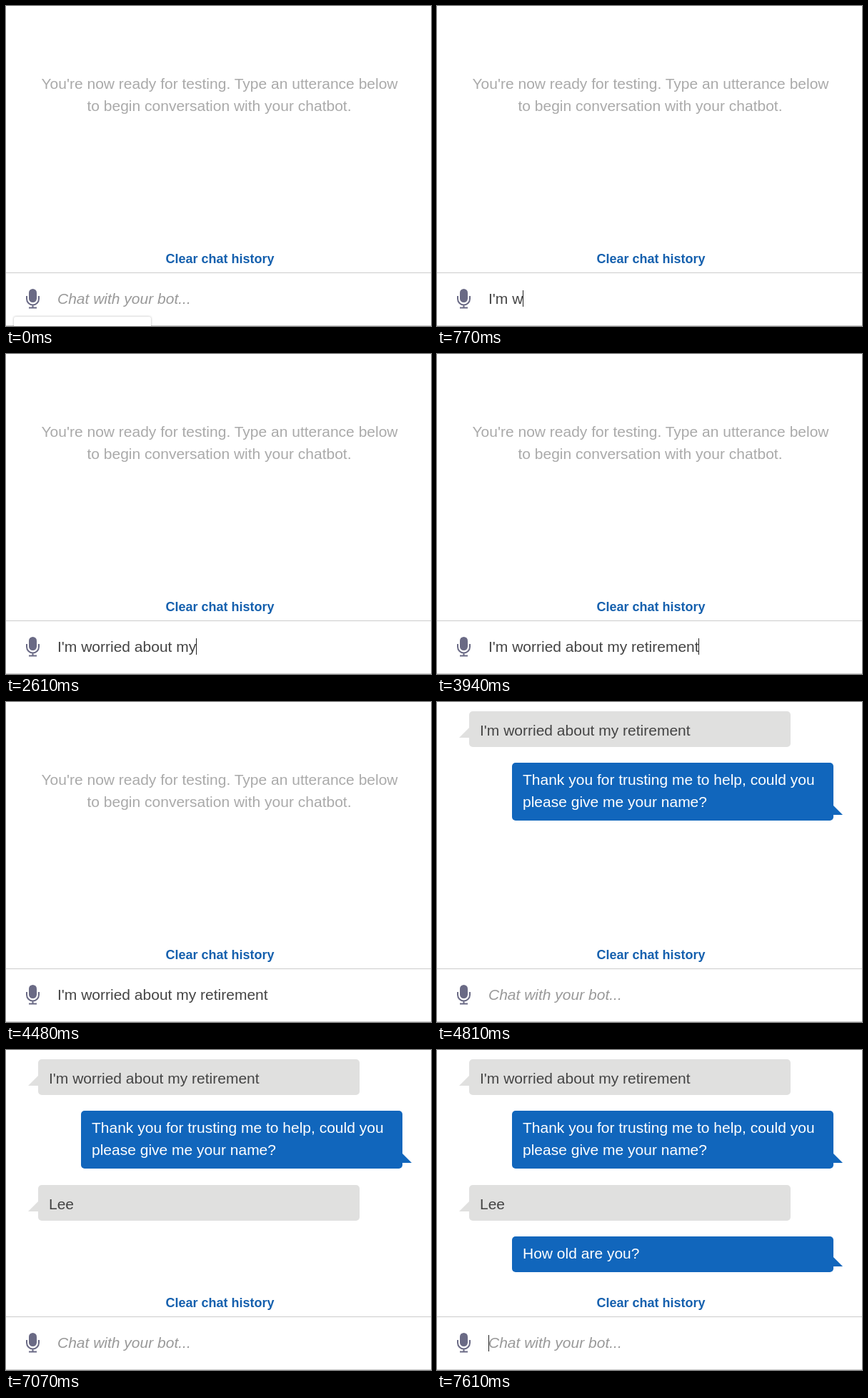
Write an HTML page that moves like this. It is 595 px wide and 448 px high and loops after 8000 ms.

```html
<!DOCTYPE html>
<html lang="en">
<head>
<meta charset="utf-8">
<title>Chatbot test</title>
<style>
html, body { margin: 0; height: 100%; overflow: hidden; background: #fff; }
svg { display: block; }
text { font: 21px "Liberation Sans", Arial, sans-serif; white-space: pre; fill: #444; }
.mid { text-anchor: middle; }
#intro text { fill: #aaa; }
#clear { font-weight: bold; font-size: 18px; fill: #1560ae; }
#hint { font-style: italic; fill: #999; }
.user { fill: #e0e0df; }
.bot { fill: #1166bc; }
.bot text { fill: #fff; }
.user text { fill: #444; }
#popup { fill: #fff; filter: drop-shadow(0 0 1.5px rgba(0, 0, 0, .3)); }
</style>
</head>
<body>
<svg width="595" height="448" viewBox="0 0 595 448">
  <g id="intro">
    <text class="mid" x="299" y="116">You're now ready for testing. Type an utterance below</text>
    <text class="mid" x="298.5" y="147">to begin conversation with your chatbot.</text>
  </g>
  <g id="chat"></g>
  <text id="clear" class="mid" x="299.5" y="360">Clear chat history</text>
  <path d="M0 373.5H595M0 447.5H595" stroke="#ccc"/>
  <rect x="32" y="396" width="11" height="19" rx="5.5" fill="#6a6a85"/>
  <path d="M29 406v4a8.5 8.5 0 0 0 17 0v-4M37.5 418.500v4M32 422.500h11" fill="none" stroke="#6a6a85" stroke-width="2"/>
  <text id="hint" x="72" y="417">Chat with your bot...</text>
  <text id="input" x="72" y="417"></text>
  <rect id="caret" width="1" height="23" fill="#222"/>
  <rect id="popup" x="11" y="435" width="192" height="20" rx="3"/>
</svg>
<script>
const LOOP = 8000;
const $ = id => document.getElementById(id);

// Typed messages: one key time per letter, then the time of sending
const typed = [
  { text: "I'm worried about my retirement", sent: 4540, keys: [
    200, 400, 540, 630, 770, 870, 960, 1160, 1290, 1420, 1620, 1750,
    1810, 1910, 2010, 2110, 2210, 2310, 2410, 2610, 2740, 2810, 2950,
    3150, 3280, 3420, 3520, 3620, 3740, 3840, 3940] },
  { text: "Lee", sent: 6870, keys: [6140, 6340, 6540] }
];
const blinks = [200, 4480, 5080, 5540, 6140, 7070, 7610];

const bubbles = [
  { at: 4540, y: 13, h: 50, lines: [typed[0].text] },
  { at: 4810, y: 85, h: 81, bot: true,
    lines: ["Thank you for trusting me to help, could you", "please give me your name?"] },
  { at: 6870, y: 189, h: 50, lines: [typed[1].text] },
  { at: 7210, y: 261, h: 50, bot: true, lines: ["How old are you?"] }
];

$("chat").innerHTML = bubbles.map(({ y, h, bot, lines }) => {
  const x = bot ? 105 : 45;
  const tail = bot ? `M555 ${y + h - 21}l13 13h-13z` : `M45 ${y + h - 27}l-14 14h14z`;
  const rows = lines.map((s, i) =>
    `<text x="${x + 15}" y="${y + (bot ? 31 : 34) + 31 * i}">${s}</text>`).join("");
  return `<g class="${bot ? "bot" : "user"}">
    <rect x="${x}" y="${y}" width="450" height="${h}" rx="5"/><path d="${tail}"/>${rows}</g>`;
}).join("");
const groups = [...$("chat").children];

const passed = (times, t) => times.filter(at => at <= t).length;
const show = (el, on) => { el.style.display = on ? "" : "none"; };

function draw(t) {
  const msg = typed.find(m => t < m.sent);
  const text = msg ? msg.text.slice(0, passed(msg.keys, t)) : "";
  const input = $("input"), caret = $("caret");
  input.textContent = text;
  caret.setAttribute("x", 72 + (text ? Math.floor(input.getComputedTextLength()) : 0));
  caret.setAttribute("y", text ? 398 : 399);
  show(caret, passed(blinks, t) % 2);
  show($("hint"), !text);
  show($("popup"), t < 460);
  show($("intro"), t < bubbles[0].at);
  groups.forEach((g, i) => show(g, t >= bubbles[i].at));
}

const start = performance.now();
function tick() {
  draw((performance.now() - start) % LOOP);
  requestAnimationFrame(tick);
}
tick();
</script>
</body>
</html>
```
